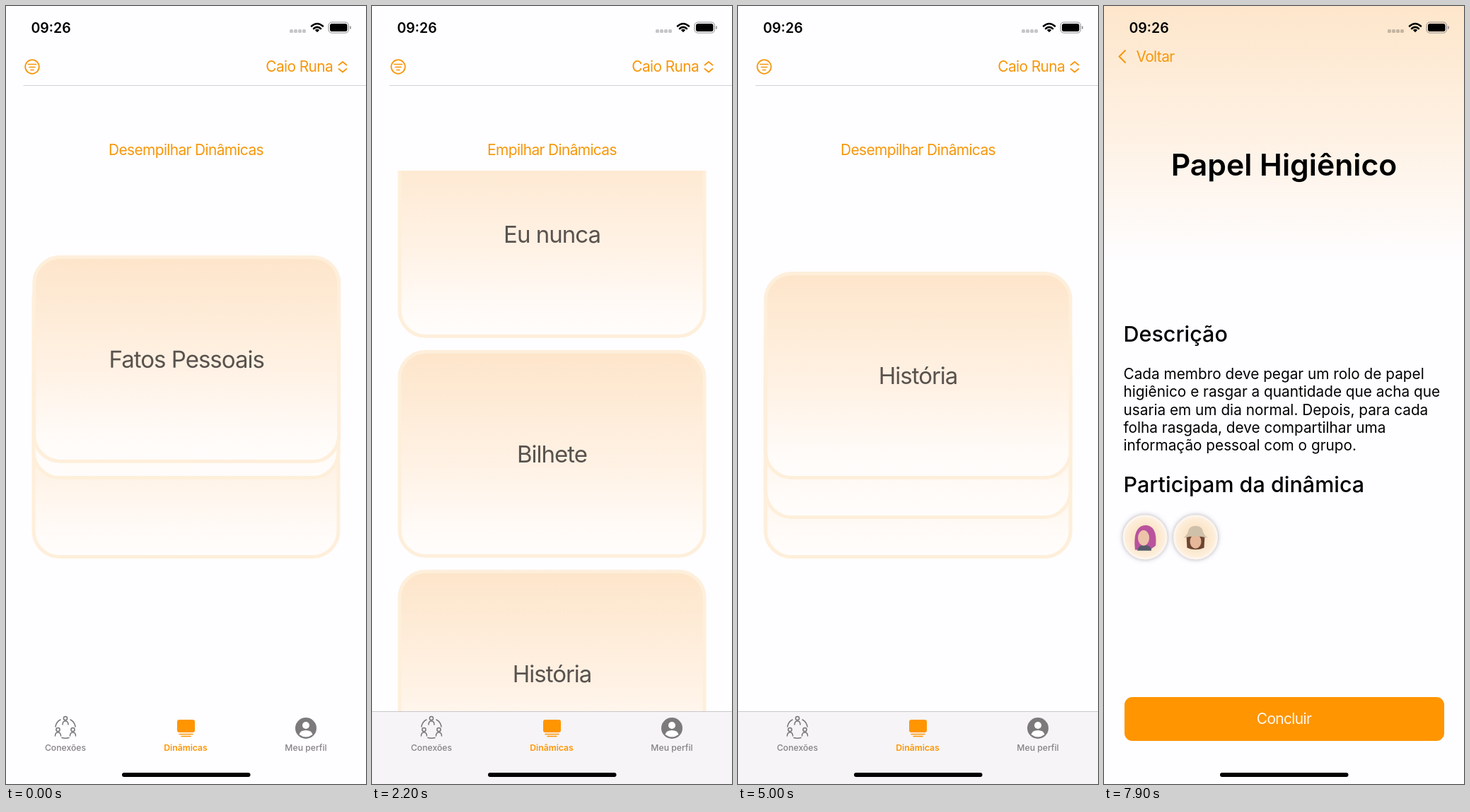
An HTML page that plays this animation: 509x1101 px, repeating every 8000 ms.

```html
<!DOCTYPE html>
<html lang="pt">
<head>
<meta charset="utf-8">
<title>Dinâmicas</title>
<style>
  html, body { margin: 0; width: 100%; height: 100%; overflow: hidden; background: #fefdff; }
  svg { display: block; width: 100vw; height: 100vh; }
  text { font-family: Inter, "Noto Sans", sans-serif; font-optical-sizing: none; white-space: pre; }
  .ui { font-size: 20.9px; letter-spacing: -.03em; fill: #f79709; }
  .card text { font-size: 33px; letter-spacing: -.03em; fill: #59524e; }
  .title { font-size: 42.7px; font-weight: 600; }
  .section { font-size: 30.5px; font-weight: 500; }
  .body { font-size: 20.77px; }
  .tab { font-size: 12.2px; font-weight: 500; fill: #858284; }
  .mid { text-anchor: middle; }
  .end { text-anchor: end; }
  .line { fill: none; stroke-linecap: round; stroke-linejoin: round; }
</style>
</head>
<body>
<svg id="stage" viewBox="0 0 509 1101"></svg>
<script>
const LOOP = 8000, STEP = 100;
const WIDTH = 509, HEIGHT = 1101, MIDDLE = WIDTH / 2;
const ORANGE = '#ff9500', TINT = '#f79709', PAGE = '#fefdff';
const REWIND_END = 1200, FILTER_AT = 5800;
const titles = ['Apresentação rápida', 'Bingo de Perguntas', 'Eu nunca', 'Bilhete',
  'História', 'Fatos Pessoais', 'Papel Higiênico', '', ''];

// Each deck lists its cards, and each swipe sends the next card away.
const ownDeck = { cards: [0, 1, 2, 3, 4, 5, 7, 8], grounded: 7 };
const fullDeck = { cards: [0, 1, 2, 6, 7] };

const mix = (a, b, k) => a + (b - a) * k;
const clamp = (v, lo, hi) => Math.min(hi, Math.max(lo, v));
const ramp = (t, start, span) => clamp((t - start) / span, 0, 1);
const smooth = k => k * k * (3 - 2 * k);
const easeOut = k => 1 - (1 - k) ** 3;

const text = (x, y, cls, str, extra = '') => `<text x="${x}" y="${y}" class="${cls}" ${extra}>${str}</text>`;
const line = (d, color, width) => `<path class="line" d="${d}" stroke="${color}" stroke-width="${width}"/>`;
const rect = (x, y, w, h, r, fill) => `<rect x="${x}" y="${y}" width="${w}" height="${h}" rx="${r}" fill="${fill}"/>`;
const circle = (x, y, r, fill) => `<circle cx="${x}" cy="${y}" r="${r}" fill="${fill}"/>`;

const card = (title, i) => `<g class="card" id="card${i}">
  <rect x="-215.5" y="-144.5" width="431" height="289" rx="37" fill="url(#cardFill)" stroke="#feefdb" stroke-width="5"/>
  ${text(0, 12, 'mid', title)}</g>`;

const heads = {
  pink: '<path d="M-14 18Q-18-16 1-17Q18-16 15 12L8 17Z" fill="#b9539d"/>' +
    '<path d="M-11 19Q-9 10 0 11Q9 12 9 19Z" fill="#555a6b"/><ellipse cx="-2" cy="1" rx="8" ry="11" fill="#edc3aa"/>',
  beard: '<path d="M-12 0Q-15-17 0-17Q15-17 12 0Z" fill="#302c2b"/><ellipse rx="11" ry="13" fill="#dcae8c"/>' +
    '<path d="M-11 1Q-4 7 0 5Q4 7 11 1Q12 18 0 19Q-12 18-11 1Z" fill="#302c2b"/>',
  hat: '<path d="M-13-2H13L12 15Q0 20-12 15Z" fill="#6d4532"/><ellipse cy="6" rx="8" ry="10" fill="#e6b798"/>' +
    '<path d="M-17 1Q-11-4-10-10Q-8-16 0-16Q8-16 10-10Q11-4 17 1Q0-4-17 1Z" fill="#cfc0aa"/>'
};
const avatar = (x, y, head) => `<g transform="translate(${x} ${y})">
  <circle r="30" fill="url(#avatarFill)" stroke="#fdf5ec" stroke-width="3" filter="url(#soft)"/>${heads[head]}</g>`;

function sheet(id, title, x, top, lines, people) {
  const leading = 25.35, first = top + 53, after = first + lines.length * leading;
  return `<g id="${id}">${rect(0, 0, WIDTH, HEIGHT, 0, PAGE)}${rect(0, 0, WIDTH, 360, 0, 'url(#sheetFill)')}
    ${line('M30 63L21.5 71.5L30 80', TINT, 2)}${text(45.5, 79, 'ui', 'Voltar')}
    ${text(MIDDLE, 239.5, 'title mid', title)}
    ${text(x, top, 'section', 'Descrição')}
    ${lines.map((row, i) => text(x, first + i * leading, 'body', row)).join('')}
    ${text(x, after + 33, 'section', 'Participam da dinâmica')}
    ${people.map((head, i) => avatar(x + 30.5 + i * 71.5, after + 97, head)).join('')}
    ${rect(29, 978, 452, 62, 11, ORANGE)}${text(MIDDLE, 1015.5, 'ui mid', 'Concluir', 'style="fill:#fff8ee"')}</g>`;
}

const person = (x, y) => `<circle cx="${x}" cy="${y - 3}" r="2.6"/>
  <path d="M${x - 4} ${y + 6}q0-5 4-5q4 0 4 5"/>`;

const tabs = `<g id="tabBack">${rect(0, 998, WIDTH, 103, 0, '#f6f4f6')}${line('M0 998.5H509', '#c9c7ca', 1)}</g>
  <g class="line" stroke="#787577" stroke-width="1.5">${person(84, 1011)}${person(73.5, 1027)}${person(94.5, 1027)}
    <path d="M70 1020Q71 1013 77 1010M91 1010Q97 1013 98 1020M79 1035.5Q84 1037 89 1035.5"/></g>
  ${rect(242, 1010, 25, 18, 3, ORANGE)}${line('M245 1030.5H264M248 1033.5H261', ORANGE, 1.5)}
  ${circle(424, 1022, 15, '#7d7a7c')}${circle(424, 1018, 5, '#fff')}
  <path d="M414.5 1031Q416 1025 424 1025Q432 1025 433.5 1031Q424 1038 414.5 1031Z" fill="#fff"/>
  ${text(84, 1054, 'tab mid', 'Conexões')}
  ${text(254, 1054, 'tab mid', 'Dinâmicas', `style="fill:${ORANGE};font-weight:600"`)}
  ${text(424, 1054, 'tab mid', 'Meu perfil')}`;

const header = `${rect(0, 0, WIDTH, 112, 0, PAGE)}${line('M25 112.5H509', '#d3d1d5', 1)}
  <circle cx="37" cy="86" r="9.8" fill="none" stroke="${TINT}" stroke-width="1.8"/>
  ${line('M31.5 82.5H42.5M33 86.5H41M35 90.5H39', TINT, 1.7)}
  ${text(462, 93, 'ui end', '', 'id="filter"')}
  ${line('M470.5 83.5L476 79L481.5 83.5M470.5 89L476 93.5L481.5 89', TINT, 1.8)}`;

const signal = [0, 1, 2, 3].map(i => rect(401 + 6 * i, 33, 5, 5, 1.5, 'rgba(0,0,0,.22)')).join('');
const status = `${text(35.5, 37.5, '', '09:26', 'font-size="19.5" font-weight="600"')}${signal}
  ${line('M432 28.5Q440 21.5 448 28.5M435 32Q440 27.8 445 32', '#000', 2.6)}
  <path d="M436.8 34Q440 31.4 443.2 34L440 37.2Z"/>
  <rect x="456" y="23" width="28.5" height="15" rx="4.5" fill="none" stroke="#8a8688"/>
  ${rect(458, 25, 24.5, 11, 2.8, '#000')}${line('M487 29V32', '#8a8688', 1.5)}
  ${rect(164, 1085, 181.5, 6, 3, '#000')}`;

const storyText = ['Cada membro deve escrever um pedaço de', 'uma história em um pedaço de papel, sem que',
  'os outros membros vejam. Em seguida, os', 'papéis são misturados e cada membro deve',
  'escolher um papel e continuar a história por', 'mais algumas frases. O resultado final é uma',
  'história coletiva, criada por todos os membros', 'do grupo.'];
const paperText = ['Cada membro deve pegar um rolo de papel', 'higiênico e rasgar a quantidade que acha que',
  'usaria em um dia normal. Depois, para cada', 'folha rasgada, deve compartilhar uma',
  'informação pessoal com o grupo.'];

const stop = (at, color) => `<stop offset="${at}" stop-color="${color}"/>`;
document.getElementById('stage').innerHTML = `<defs>
  <linearGradient id="cardFill" x2="0" y2="1">${stop(0, '#fde5ca')}${stop(.6, '#fff3e7')}${stop(.85, '#fffaf6')}${stop(1, '#fffdfc')}</linearGradient>
  <linearGradient id="sheetFill" x2="0" y2="1">${stop(0, '#fde6cb')}${stop(.5, '#fef1e3')}${stop(1, PAGE)}</linearGradient>
  <radialGradient id="avatarFill">${stop(.4, '#fbe2c3')}${stop(1, '#fdf0df')}</radialGradient>
  <filter id="soft" x="-30%" y="-30%" width="160%" height="160%"><feDropShadow dx="0" dy="0" stdDeviation="3" flood-color="#667" flood-opacity=".55"/></filter>
  <clipPath id="listClip"><rect y="233" width="509" height="868"/></clipPath></defs>
  ${text(MIDDLE, 211, 'ui mid', '', 'id="toggle"')}
  <g id="cards">${titles.map(card).join('')}</g>
  ${tabs}${header}
  ${sheet('story', 'História', 22, 437, storyText, ['pink', 'beard', 'hat'])}
  ${sheet('paper', 'Papel Higiênico', 27.5, 475, paperText, ['pink', 'hat'])}
  ${status}`;

const $ = id => document.getElementById(id);
const cardNodes = titles.map((_, i) => $('card' + i));

// The first swipe is let go, so its clock runs backwards.
function swipesAt(t) {
  if (t < REWIND_END) return { deck: ownDeck, clock: 310 - t, from: 5, count: 1, gap: 0 };
  if (t < FILTER_AT) return { deck: ownDeck, clock: t - 2600, from: 3, count: 1, gap: 0 };
  return { deck: fullDeck, clock: t - 5856, from: 0, count: 3, gap: 412 };
}

function placeCards(t) {
  const { deck, clock, from, count, gap } = swipesAt(t);
  const spread = smooth(ramp(t, 500, 400)) - smooth(ramp(t, 2300, 300));
  const scroll = 930 * ramp(t, 1400, 900) ** 2.68;
  let depth = from;
  for (let n = 0; n < count; n++) depth += ramp(clock, n * gap, 300);

  const placed = deck.cards.map((id, slot) => {
    const n = slot - from;
    const fly = n < 0 ? 1 : n < count ? ramp(clock, n * gap + 200, 560) ** 2 : 0;
    const behind = slot === deck.grounded ? 2 : clamp(slot - depth, 0, 2);
    return {
      node: cardNodes[id],
      layer: slot + (fly > .2 ? titles.length : 0),
      x: MIDDLE + 490 * fly ** 2 * (1 - spread),
      y: mix(523 + 56 * behind - 600 * fly, 379 - scroll + 311 * slot, spread),
      turn: 28 * fly ** 2 * (1 - spread)
    };
  });
  placed.sort((a, b) => b.layer - a.layer);
  for (const { node, x, y, turn } of placed)
    node.setAttribute('transform', `translate(${x} ${y}) rotate(${turn})`);
  $('cards').replaceChildren(...placed.map(p => p.node));
  $('cards').setAttribute('clip-path', spread > .3 ? 'url(#listClip)' : 'none');
}

function placeSheet(id, shown, rest) {
  $(id).setAttribute('transform', `translate(0 ${mix(HEIGHT, rest, shown)})`);
}

function draw(t) {
  placeCards(t);
  $('toggle').textContent = (t >= 600 && t < 2400 ? 'Empilhar' : 'Desempilhar') + ' Dinâmicas';
  $('filter').textContent = t < FILTER_AT ? 'Caio Runa' : 'Todos';
  $('tabBack').style.display = t < 600 ? 'none' : '';
  placeSheet('story', easeOut(ramp(t, 3600, 400)) - smooth(ramp(t, 4500, 500)), 7);
  placeSheet('paper', easeOut(ramp(t, 7300, 600)), 0);
}

const start = performance.now();
function tick() {
  const t = (performance.now() - start) % LOOP;
  draw(Math.floor(t / STEP) * STEP);
  requestAnimationFrame(tick);
}
tick();
</script>
</body>
</html>
```
